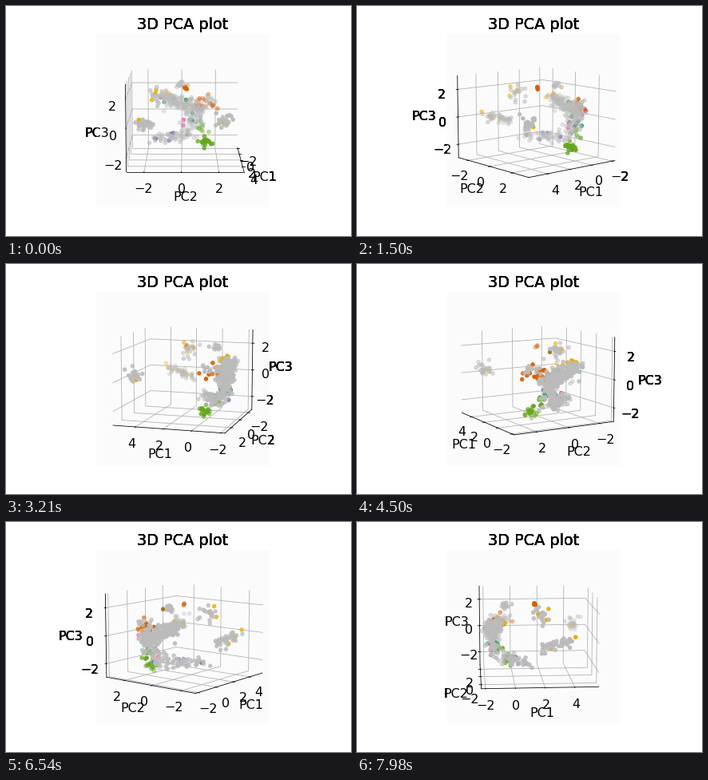
Write a matplotlib script that moves like this. It is 432 px wide and 288 px high and loops after 8000 ms.

```python
import numpy as np
import matplotlib.pyplot as plt
from matplotlib.animation import FuncAnimation
from matplotlib.text import Text
from mpl_toolkits.mplot3d import Axes3D

FRAMES = 267
LOOP_MS = 8000

COLORS = {"n": "#bbbbbb", "t": "#1b9e77", "o": "#d95f02", "v": "#7570b3",
          "p": "#e7298a", "g": "#66a61e", "y": "#e6ab02", "b": "#a6761d"}

plt.rcParams.update({"font.size": 16, "font.family": "DejaVu Sans"})
rng = np.random.default_rng(7)


class BoldLabels(Axes3D):
    """Overprints its text so that the antialiased edges turn dark."""

    def draw(self, renderer):
        super().draw(renderer)
        for text in self.findobj(Text):
            for _ in range(3):
                text.draw(renderer)


def branch(n, start, end, mix, spread=0.2):
    """Scatter n points along a line, coloured at random from the mix."""
    t = rng.random((n, 1))
    pts = np.array(start) * (1 - t) + np.array(end) * t
    return pts + rng.normal(0, spread, (n, 3)), rng.choice(list(mix), n)


def make_cloud():
    parts = [
        branch(150, (-1.2, -0.9, 1.1), (-1.6, 1.1, 0), "n" * 22 + "tpy", 0.28),
        branch(50, (-1.5, 0.8, 0), (-1, 0.5, -1.5), "n" * 12 + "ttpv", 0.3),
        branch(55, (-0.8, 0.5, -1.6), (0.9, -1.5, -1.7), "n" * 7 + "v"),
        branch(45, (2, -1.9, -0.6), (3.7, -2.2, 0.1), "nnnny"),
        branch(24, (4.3, 2.3, 0.3), (4.6, 2.3, 0.4), "n" * 9 + "yb"),
        branch(12, (-0.7, 0, 2.1), (-0.4, 0, 2.2), "nnnb", 0.15),
        branch(20, (1.6, -1.2, 1.8), (2, -1.5, 1.6), "nnnny", 0.3),
        branch(14, (-1, -1, 1.2), (-1, -0.3, 1.2), "ny"),
        branch(36, (-1.6, 0.9, 0.7), (-0.2, 2, 0.8), "no", 0.25),
        branch(20, (-0.2, 1.4, -2.3), (-0.3, 1.4, -2.1), "g"),
        branch(10, (-0.5, 1.3, -1.9), (-1.3, 1.1, -1), "g"),
        branch(4, (1.5, 0.2, 2.2), (1.6, 0.2, 2.2), "ooob", 0.06),
    ]
    pts, tags = zip(*parts)
    return np.vstack(pts), np.concatenate(tags)


def make_axes(fig, **kwargs):
    ax = fig.add_subplot(111, **kwargs)
    ax.set_title("3D PCA plot", y=1)
    ax.title.set_y(1)  # 3D axes lower the title by default
    ax.set(xlabel="PC1", ylabel="PC2", zlabel="PC3",
           xticks=[-2, 0, 2, 4], yticks=[-2, 0, 2], zticks=[-2, 0, 2],
           xlim=(-2.28, 5.62), ylim=(-2.95, 3.35), zlim=(-2.98, 2.99))
    for axis in (ax.xaxis, ax.yaxis, ax.zaxis):
        axis.set_pane_color((1, 1, 1, 0))
    return ax


fig = plt.figure(figsize=(6, 4), dpi=72, facecolor="white")
fig.subplots_adjust(left=0.125, right=0.9, bottom=0.125, top=0.88)

# The lower axes only show where their labels leave the square
under = make_axes(fig, axes_class=BoldLabels)
under.grid(False)
ax = make_axes(fig, projection="3d")
ax.set_facecolor("#fbfbfb")

points, tags = make_cloud()
for tag, color in COLORS.items():
    ax.scatter(*points[tags == tag].T, c=color, s=20)


def update(i):
    # The tiny offset settles which edges carry the axes at right angles
    for view in (under, ax):
        view.view_init(elev=10, azim=i + 1e-5)
    return []


anim = FuncAnimation(fig, update, frames=FRAMES, interval=LOOP_MS / FRAMES,
                     init_func=lambda: update(0), repeat=True,
                     repeat_delay=0, blit=False)
plt.show()
```
